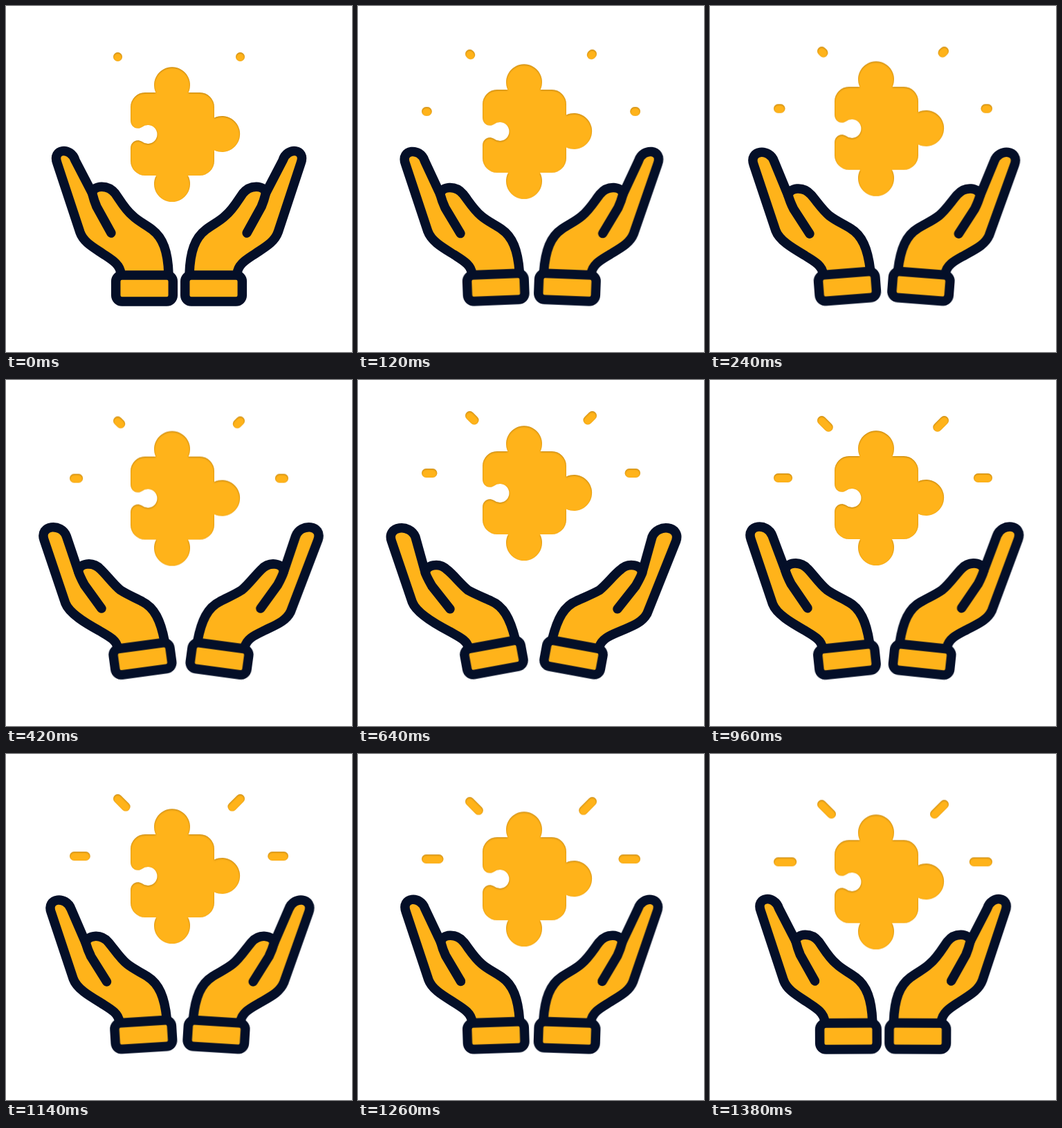
These frames come from a looping animation (500x500 px, 1400 ms). An HTML page:

```html
<!DOCTYPE html>
<html lang="en">
<head>
<meta charset="utf-8">
<title>Hands and puzzle piece</title>
<style>
  html, body { margin: 0; width: 100%; height: 100%; overflow: hidden; background: #fff; }
  svg { display: block; width: 100vw; height: 100vh; }
  svg * { animation: 1.4s linear infinite; }

  .palm, .crease, .cuff {
    fill: #ffb31a;
    stroke: #040f28;
    stroke-width: 13.5;
    stroke-linecap: round;
    stroke-linejoin: round;
  }
  .palm {
    d: path("M166 387C165 373 152 366 140 358C125 348 112 341 107 327L74 227C66 206 94 203 100 223L124.5 270C127 259 147 257 158 271C165 281 172 294 183 303C191 311 202 316 211 323C227 335 234 355 235 387");
  }
  .crease { fill: none; }
  .piece { fill: #ffb31a; }
  .ray, .side { fill: none; stroke: #ffb31a; stroke-width: 13; stroke-linecap: round; }

  .float { animation-name: float; }
  .drift { animation-name: drift; }
  .left { animation-name: open-left; }
  .right { animation-name: open-right; }
  .crease { animation-name: crease; }
  .cuff { animation-name: cuff; transform-origin: 200px 408px; }
  .ray { animation-name: ray; }
  .side { animation-name: side, blink; }

  @keyframes float { 50% { transform: translateY(-24px); } }
  @keyframes drift {
    0%, 100% { transform: translateX(0); }
    42.86% { transform: translateX(-8.4px); }
  }
  @keyframes cuff {
    0%, 100% { transform: translate(0, 0) rotate(0deg); }
    42.86% { transform: translate(-3.7px, -7.4px) rotate(-11deg); }
  }
  /* the right hand is drawn mirrored; its heel bends less than the left one */
  @keyframes open-left {
    42.86% {
      d: path("M159 386C157 376 144.6 371 132.6 364C111 353 83 336 77 321L47 233C39.7 211 74 207 82 227L96 279.5C96 268 115 262.5 128 275C138 283 147 295 158 304C169 310 180 314 191 319C209 326 219 344 226.6 373");
    }
  }
  @keyframes open-right {
    42.86% {
      d: path("M159 386C155 373 141 368.6 127.8 363C111 356 97 351.5 89.5 338.5L47 233C39.7 211 74 207 82 227L96 279.5C96 268 115 262.5 128 275C138 283 147 295 158 304C169 310 180 314 191 319C209 326 219 344 226.6 373");
    }
  }
  @keyframes crease {
    0%, 100% { d: path("M124.5 270C126 276 128 283 131 290L152 328"); }
    42.86% { d: path("M96 279.5C98 285.5 101.7 291.5 105.7 298.5L132 331"); }
  }
  @keyframes ray {
    from { d: path("M161.5 73.5l.01 .01"); }
    to { d: path("M161.5 73.5l14.2 14.2"); }
  }
  @keyframes side {
    from { d: path("M98.5 156.5l.01 0"); }
    to { d: path("M98.5 156.5l20.5 0"); }
  }
  /* the side rays are missing for an instant as the loop restarts */
  @keyframes blink {
    0%, 1% { opacity: 0; }
    1.01%, 100% { opacity: 1; }
  }
</style>
</head>
<body>
<svg viewBox="0 0 500 500">
  <defs>
    <filter id="shade" filterUnits="userSpaceOnUse" x="0" y="0" width="500" height="500" color-interpolation-filters="sRGB">
      <feOffset in="SourceAlpha" dy="1"/>
      <feGaussianBlur stdDeviation="1.3" result="inner"/>
      <feFlood flood-color="#6b4300" flood-opacity=".45"/>
      <feComposite in2="inner" operator="out"/>
      <feComposite in2="SourceAlpha" operator="in" result="edge"/>
      <feMerge>
        <feMergeNode in="SourceGraphic"/>
        <feMergeNode in="edge"/>
      </feMerge>
    </filter>
  </defs>

  <g class="float">
    <g filter="url(#shade)">
      <path class="piece" d="M201 125H216.3A26 26 0 1 1 263.7 125H280a21 21 0 0 1 21 21V161.5A26 26 0 1 1 301 208.5V224a21 21 0 0 1-21 21H263A26 26 0 1 1 217 245H201a21 21 0 0 1-21-21V206c0-9 8-15 16.5-10a13.5 13.5 0 1 0 0-21c-8.5 5-16.5-1-16.5-10V146a21 21 0 0 1 21-21z"/>
      <path class="ray"/>
      <path class="side"/>
      <g transform="translate(500) scale(-1 1)">
        <path class="ray"/>
        <path class="side"/>
      </g>
    </g>
  </g>

  <g>
    <path class="palm left"/>
    <path class="crease"/>
    <rect class="cuff" x="158.7" y="389" width="82.6" height="38" rx="9"/>
  </g>
  <g transform="translate(500) scale(-1 1)">
    <g class="drift">
      <path class="palm right"/>
      <path class="crease"/>
      <rect class="cuff" x="158.7" y="389" width="82.6" height="38" rx="9"/>
    </g>
  </g>
</svg>
</body>
</html>
```
